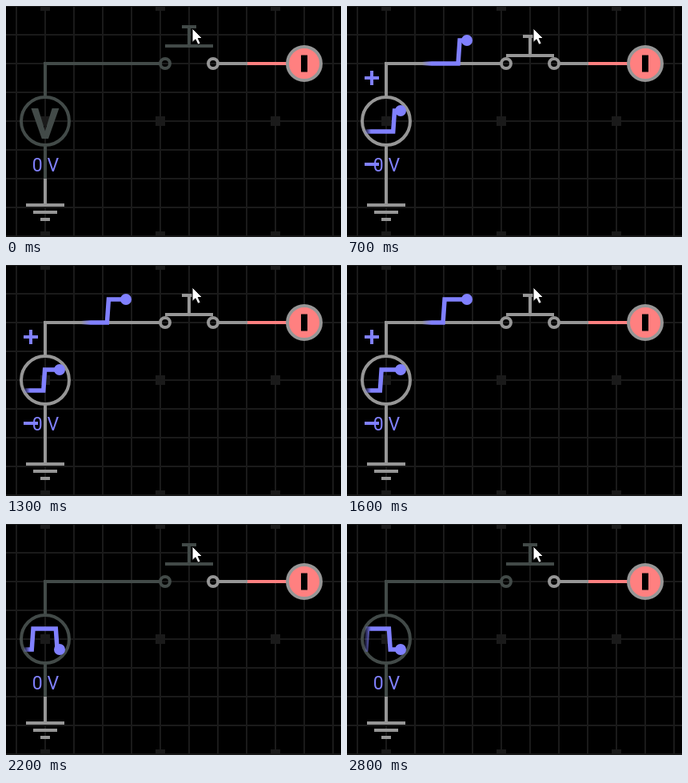
An HTML page that plays this animation: 419 px wide and 289 px high, repeating every 2900 ms.

```html
<!DOCTYPE html>
<html lang="en">
<head>
<meta charset="utf-8">
<title>Push button circuit</title>
<style>
  html, body { margin: 0; width: 100%; height: 100%; overflow: hidden; background: #000; }
  svg { display: block; }
  .line { fill: none; stroke-width: 4; }
  .lit { stroke: #969696; }
  .off { stroke: #424a48; }
  .red { stroke: #ff8080; }
  .sign { stroke: #8080ff; }
  .trace { fill: none; stroke-width: 5.5; stroke-linejoin: miter; }
  .dot { fill: #8080ff; }
  text { font-family: Roboto, Arial, sans-serif; text-anchor: middle; }
</style>
</head>
<body>
<svg width="419" height="289" viewBox="0 0 419 289">
  <defs>
    <pattern id="grid" x="-5" y="-18" width="36" height="36" patternUnits="userSpaceOnUse">
      <path d="M18 0V36M0 18H36" stroke="#1a1a1a" stroke-width="2"/>
    </pattern>
    <pattern id="marks" x="-23" y="-72" width="144" height="144" patternUnits="userSpaceOnUse">
      <rect x="66" y="66" width="12" height="12" fill="#1a1a1a"/>
    </pattern>
    <linearGradient id="scopeFade" gradientUnits="userSpaceOnUse" x1="21" y1="0" x2="30" y2="0">
      <stop offset="0" stop-color="#8080ff" stop-opacity="0"/>
      <stop offset="1" stop-color="#8080ff"/>
    </linearGradient>
    <linearGradient id="wireFade" gradientUnits="userSpaceOnUse" x1="94" y1="0" x2="106" y2="0">
      <stop offset="0" stop-color="#8080ff" stop-opacity="0"/>
      <stop offset="1" stop-color="#8080ff"/>
    </linearGradient>
  </defs>
  <rect width="419" height="289"/>
  <rect width="419" height="289" fill="url(#grid)"/>
  <rect width="419" height="289" fill="url(#marks)"/>

  <!-- parts that follow the switch -->
  <g id="live" class="line">
    <path d="M49 113V72H192M49 175V217"/>
    <circle cx="49" cy="144" r="30"/>
    <circle cx="199" cy="72" r="6"/>
    <path id="button" d="M199 50H259M229 50V26M220 26H238"/>
  </g>

  <g class="line lit">
    <path d="M49 216V249M25 249H73M34 258H64M43 267H55"/>
    <path d="M266 72H302"/>
    <circle cx="259" cy="72" r="6"/>
  </g>
  <path class="line red" d="M302 72H352"/>
  <circle class="lit" cx="373" cy="72" r="21" fill="#ff8080" stroke-width="4"/>
  <rect x="369" y="61.5" width="8" height="21"/>

  <text id="meter" x="49" y="165.5" font-size="54" font-weight="700" fill="#424a48">V</text>
  <g id="scope">
    <path id="scopeTrace" class="trace" stroke="url(#scopeFade)"/>
    <circle id="scopeDot" class="dot" cx="67" r="7"/>
  </g>
  <g id="powered">
    <path id="wireTrace" class="trace" stroke="url(#wireFade)"/>
    <circle class="dot" cx="150" cy="43" r="7"/>
    <path class="line sign" d="M22 90H40M31 81V99M22 198H40"/>
  </g>
  <text x="49.5" y="206.5" font-size="23" fill="#8080ff">0 V</text>

  <path d="M233 28V45.5L237 41.8L240 48.3L243.2 46.9L240.3 40.5H245.5Z"
        fill="#fff" stroke="#000" stroke-width="1"/>
</svg>
<script>
  const LOOP = 2900, TICK = 100;
  const PRESS = 3, RELEASE = 19, PAUSE = 21;
  const $ = id => document.getElementById(id);
  const show = (id, on) => $(id).setAttribute("visibility", on ? "visible" : "hidden");

  // A slightly slanted edge between two levels, centred on x.
  const edge = (x, slant, from, to) => `L${x - slant} ${from}L${x + slant} ${to}`;

  function draw(time) {
    const tick = Math.floor((time % LOOP) / TICK);
    const started = tick >= PRESS;
    const pressed = started && tick < RELEASE;
    const age = tick - PRESS - (tick >= PAUSE ? 1 : 0);
    const sinceRelease = age - (RELEASE - PRESS);

    $("live").setAttribute("class", "line " + (pressed ? "lit" : "off"));
    $("button").setAttribute("transform", `translate(0 ${pressed ? 12 : 0})`);
    show("meter", !started);
    show("scope", started);
    show("powered", pressed);
    if (!started) return;

    const low = 157, high = 131;
    const rise = Math.max(65.9 - 1.82 * age, 24.6);
    let path = `M22 ${low}` + edge(rise, 0.9, low, high);
    if (!pressed) path += edge(66.5 - 1.65 * sinceRelease, 0.9, high, low);
    const level = pressed ? high : low;
    $("scopeTrace").setAttribute("d", path + `L67 ${level}`);
    $("scopeDot").setAttribute("cy", level);

    if (pressed) {
      $("wireTrace").setAttribute("d",
        "M94 72" + edge(148.4 - 2.1 * age, 1, 72, 43) + "L150 43");
    }
  }

  const start = performance.now();
  function loop() {
    draw(performance.now() - start);
    requestAnimationFrame(loop);
  }
  loop();
</script>
</body>
</html>
```
